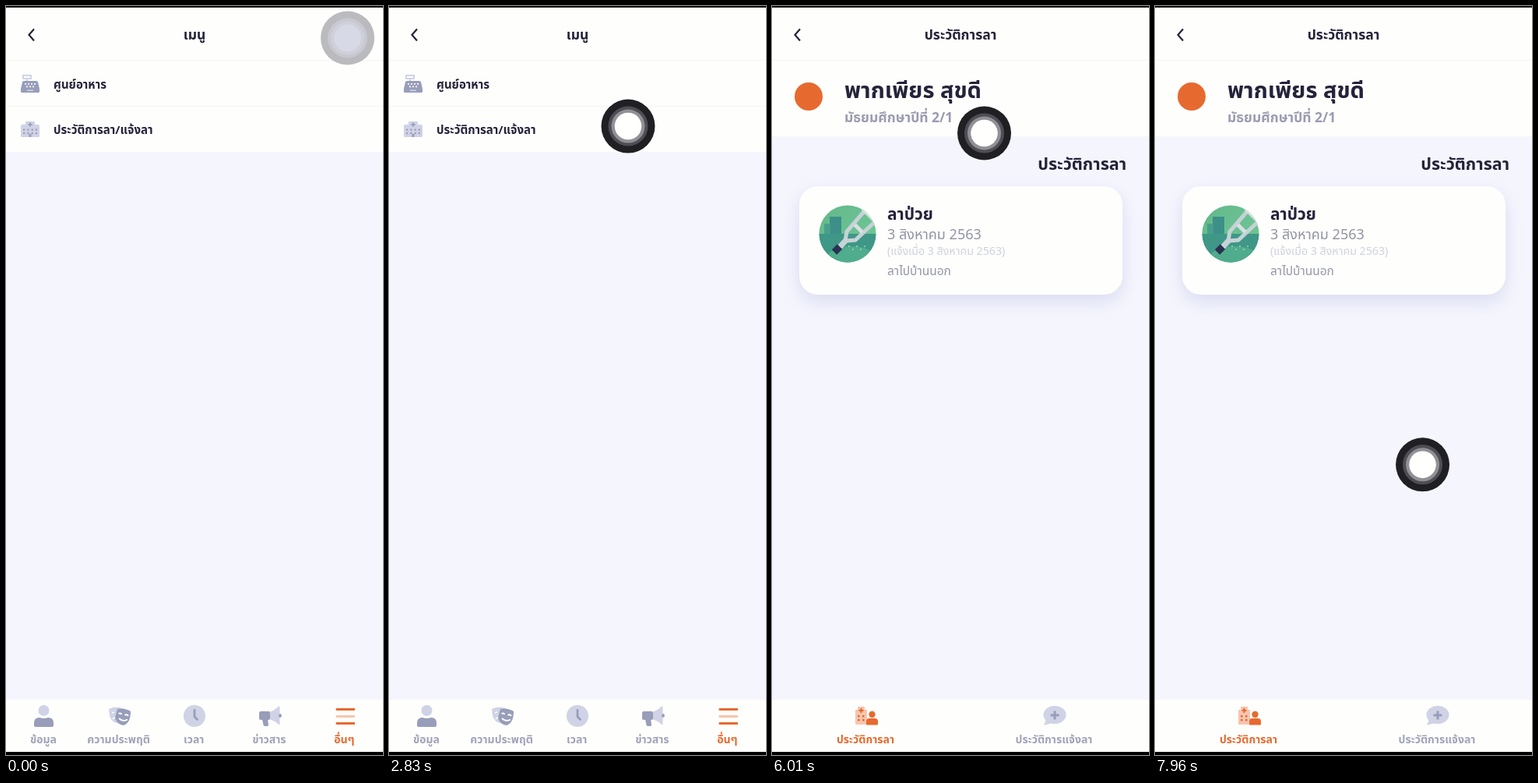
Write an HTML page with a canvas that moves like this. It is 484 by 960 pixels and loops after 7990 ms.

```html
<!DOCTYPE html>
<html lang="th">
<head>
<meta charset="utf-8">
<title>เมนู</title>
<style>
  html, body { margin: 0; width: 100%; height: 100%; overflow: hidden; background: #f5f6fd; }
  canvas { display: block; width: 484px; height: 960px; }
</style>
</head>
<body>
<canvas id="stage" width="484" height="960"></canvas>
<script>
const ctx = document.getElementById('stage').getContext('2d');
const W = 484, H = 960, LOOP = 7990;
const FONT = '"Noto Sans Thai Looped", "Noto Sans", "Noto Sans Thai", sans-serif';
const PAPER = '#fefefc', BACK = '#f5f6fd', RULE = '#f3f4fb', INK = '#24233a',
      PALE = '#d0d3e6', SLATE = '#989db9', MUTED = '#a0a3ba', ORANGE = '#e66a30', PEACH = '#f7c5ae';

// Time, x and y of the floating button
const PATH = [
  [0, 438.5, 41], [1640, 438.5, 41], [1740, 437, 46], [2350, 345, 133],
  [2830, 307, 154], [3680, 279.5, 166], [4300, 272.5, 163], [6350, 272.5, 163],
  [6800, 280, 205], [7260, 303, 322], [7960, 343.5, 587.5], [7990, 345, 597]
];
const WAKE = 1560, PUSH = 4970, PUSH_TIME = 350;

const clamp = v => Math.max(0, Math.min(1, v));
const mix = (a, b, k) => a + (b - a) * k;

function rect(x, y, w, h, color, r = 0) {
  ctx.fillStyle = color;
  ctx.beginPath();
  ctx.roundRect(x, y, w, h, r);
  ctx.fill();
}

function disc(x, y, rx, color, ry = rx) {
  ctx.fillStyle = color;
  ctx.beginPath();
  ctx.ellipse(x, y, rx, ry, 0, 0, Math.PI * 2);
  ctx.fill();
}

function shape(d, color) {
  ctx.fillStyle = color;
  ctx.fill(new Path2D(d));
}

function stroke(d, color, width, cap = 'butt') {
  ctx.strokeStyle = color;
  ctx.lineWidth = width;
  ctx.lineCap = cap;
  ctx.stroke(new Path2D(d));
}

function text(str, x, y, size, color = INK, weight = 400, align = 'left') {
  ctx.font = `${weight} ${size}px ${FONT}`;
  ctx.textAlign = align;
  ctx.fillStyle = color;
  ctx.fillText(str, x, y);
}

function plus(x, y, r, w, color) {
  rect(x - r, y - w / 2, 2 * r, w, color);
  rect(x - w / 2, y - r, w, 2 * r, color);
}

function registerIcon() {
  stroke('M22 89H32V93H22ZM27 93V97', PALE, 2);
  shape('M23 96H39Q40.500 96 41 97.500L43 106H19L21 97.500Q21.500 96 23 96Z', SLATE);
  rect(19, 105, 24, 6, SLATE, 1.5);
  for (let i = 0; i < 4; i++) rect(24 + i * 4, 99, 2, 1.7, PAPER);
  for (let i = 0; i < 3; i++) rect(26 + i * 4, 102.5, 2, 1.7, PAPER);
  rect(27, 107.5, 8, 1.5, PALE);
}

function hospitalIcon() {
  rect(19, 152, 24, 16, PALE, 1.5);
  rect(25, 148, 12, 20, PALE, 1);
  plus(31, 152, 2.7, 1.7, SLATE);
  for (let i = 0; i < 4; i++) {
    for (const y of [157.5, 162]) rect(22 + i * 5.3, y, 2.2, 2.2, SLATE);
  }
  rect(29.5, 164, 3, 4, SLATE);
}

function personIcon() {
  disc(48.5, 903, 7, PALE);
  shape('M36 922V919Q36 912 43 912Q48.500 914 54 912Q61 912 61 919V922Q61 924 59 924H38Q36 924 36 922Z', SLATE);
}

function masksIcon() {
  shape('M132 901Q140 897 149 900L144 919Q136 919 133 910Z', PALE);
  stroke('M136 906L139 905M137 914Q139 911 142 912', PAPER, 1.6);
  shape('M143 901Q152 899 160 904Q160 919 151 922Q142 921 140 912Z', SLATE);
  stroke('M144.500 907Q147 905.500 148.500 908M152.500 909Q155 907 157 910M145 913Q150 918 156 914.500', PAPER, 2);
}

function clockIcon() {
  disc(242, 910, 14, PALE);
  stroke('M242 902.500V911L245.500 914.500', SLATE, 2.8, 'round');
}

function hornIcon() {
  rect(325, 904, 14, 11, SLATE, 2);
  shape('M329 913H336L337 922Q337 923 335 923H332Q330 923 329 913Z', SLATE);
  shape('M339 904.500Q346 902 350 897.500Q351.500 897 351.500 899V920Q351.500 922 350 921Q346 916.500 339 914.500Z', PALE);
  disc(352, 909.5, 1.8, SLATE, 2.6);
}

function burgerIcon() {
  [ORANGE, PEACH, ORANGE].forEach((c, i) => rect(423.5, 900 + i * 9, 24.5, 3, c, 1));
}

function header(title) {
  rect(0, 0, W, H, BACK);
  rect(0, 0, W, 69, PAPER);
  stroke('M36 29.500L29.500 37L36 44.500', INK, 2.2);
  text(title, 242, 43, 17.5, INK, 600, 'center');
}

function tabBar() {
  rect(0, 888, W, 72, PAPER);
  rect(0, 888, W, 1, RULE);
}

function tabLabel(str, x, active) {
  text(str, x, 945, 14, active ? ORANGE : MUTED, 600, 'center');
}

function menuPage() {
  header('เมนู');
  rect(0, 69, W, 118, PAPER);
  rect(0, 69, W, 1, RULE);
  rect(0, 128, W, 1, RULE);
  registerIcon();
  text('ศูนย์อาหาร', 61, 106, 15, INK, 600);
  hospitalIcon();
  text('ประวัติการลา/แจ้งลา', 61, 164, 15, INK, 600);
  tabBar();
  personIcon();
  masksIcon();
  clockIcon();
  hornIcon();
  burgerIcon();
  ['ข้อมูล', 'ความประพฤติ', 'เวลา', 'ข่าวสาร', 'อื่นๆ']
    .forEach((s, i) => tabLabel(s, 48 + i * 96.6, i === 4));
}

function crutchBadge() {
  ctx.save();
  ctx.beginPath();
  ctx.arc(97, 292, 36.5, 0, Math.PI * 2);
  ctx.clip();
  const sky = ctx.createLinearGradient(60, 260, 134, 320);
  sky.addColorStop(0, '#62b88a');
  sky.addColorStop(1, '#72c896');
  rect(60, 255, 75, 75, sky);
  rect(74, 270, 15, 30, '#3d9087');
  rect(67, 279, 8, 18, '#4a9f8c');
  rect(60, 292, 75, 38, '#3f9787');
  disc(102, 326, 34, '#4fac8d', 18);
  stroke('M84 312L97 298', '#c6d2d6', 7);
  stroke('M94 301L96 289L122 259M94 301L107 300L137 272', '#c6d2d6', 5);
  stroke('M106 280L116 290', '#d8dfe4', 5);
  stroke('M117 260L133 276', '#d8dfe4', 6);
  stroke('M80 315.500L87 308.500', '#2b3150', 9);
  for (let i = 0; i < 5; i++) disc(99 + i * 5, 308 + (i % 2) * 4, 0.9, '#a9dcc0');
  ctx.restore();
}

function card() {
  ctx.save();
  ctx.shadowColor = 'rgba(110, 116, 190, 0.2)';
  ctx.shadowBlur = 24;
  ctx.shadowOffsetY = 9;
  rect(35, 231, 415, 139, PAPER, 24);
  ctx.restore();
  crutchBadge();
  text('ลาป่วย', 148, 274, 21, INK, 600);
  text('3 สิงหาคม 2563', 148, 299, 18, '#9294a4');
  text('(แจ้งเมื่อ 3 สิงหาคม 2563)', 148, 319, 14.2, '#cfd1e0');
  text('ลาไปบ้านนอก', 148, 345, 15.5, '#9496a8');
}

function leavePage() {
  header('ประวัติการลา');
  rect(0, 69, W, 98, PAPER);
  rect(0, 69, W, 1, RULE);
  disc(47, 116, 18, ORANGE);
  text('พากเพียร สุขดี', 93, 118, 29, INK, 600);
  text('มัธยมศึกษาปีที่ 2/1', 93, 149, 17.5, '#9a9cb0', 600);
  text('ประวัติการลา', 455, 210, 21.5, INK, 600, 'right');
  card();
  tabBar();
  rect(107, 902, 15, 19, PEACH, 1);
  rect(110, 898, 9, 8, PEACH, 1);
  plus(114.5, 903, 3, 2, ORANGE);
  for (const x of [110, 116]) {
    for (const y of [909, 914]) rect(x, y, 2.5, 2.5, ORANGE);
  }
  disc(128.5, 908, 4.2, ORANGE);
  rect(121, 913, 15, 8.5, ORANGE, [4, 4, 1, 1]);
  disc(363, 908.5, 14.5, PALE, 11.5);
  shape('M351 913Q352 918 348.500 921Q355 922 360 918Z', PALE);
  plus(363, 909, 5.5, 3, SLATE);
  tabLabel('ประวัติการลา', 120, true);
  tabLabel('ประวัติการแจ้งลา', 362, false);
}

// Hermite interpolation; resting stretches keep zero speed at their ends
function slope(i, axis) {
  const a = PATH[i - 1], b = PATH[i], c = PATH[i + 1];
  if (!a) return 0;
  const before = (b[axis] - a[axis]) / (b[0] - a[0]);
  if (!c) return before;
  const after = (c[axis] - b[axis]) / (c[0] - b[0]);
  return before * after <= 0 ? 0 : 2 * before * after / (before + after);
}

function along(t, axis) {
  let i = 0;
  while (i < PATH.length - 2 && t > PATH[i + 1][0]) i++;
  const p = PATH[i], q = PATH[i + 1], d = q[0] - p[0], k = (t - p[0]) / d;
  const s = k * k * (3 - 2 * k);
  return mix(p[axis], q[axis], s) +
    d * k * (1 - k) * ((1 - k) * slope(i, axis) - k * slope(i + 1, axis));
}

function button(t) {
  const x = along(t, 1), y = along(t, 2), k = clamp((t - WAKE) / 120);
  const rings = [
    [34.5, [186, 186, 191], [32, 32, 36]],
    [25.5, [200, 200, 208], [78, 78, 84]],
    [21.5, [208, 208, 219], [144, 144, 150]],
    [17.3, [216, 217, 230], [255, 255, 254]]
  ];
  for (const [r, idle, held] of rings) {
    disc(x, y, r, `rgb(${idle.map((v, i) => Math.round(mix(v, held[i], k)))})`);
  }
}

function draw(t) {
  const k = 1 - (1 - clamp((t - PUSH) / PUSH_TIME)) ** 3;
  if (k < 1) {
    ctx.save();
    ctx.translate(-W * 0.3 * k, 0);
    menuPage();
    ctx.restore();
  }
  if (k > 0) {
    ctx.save();
    ctx.translate(W * (1 - k), 0);
    leavePage();
    ctx.restore();
  }
  button(t);
  rect(0, 0, W, 2, '#000');
  rect(0, 956, W, 4, '#000');
}

const start = performance.now();
function tick() {
  draw((performance.now() - start) % LOOP);
  requestAnimationFrame(tick);
}
tick();
</script>
</body>
</html>
```
